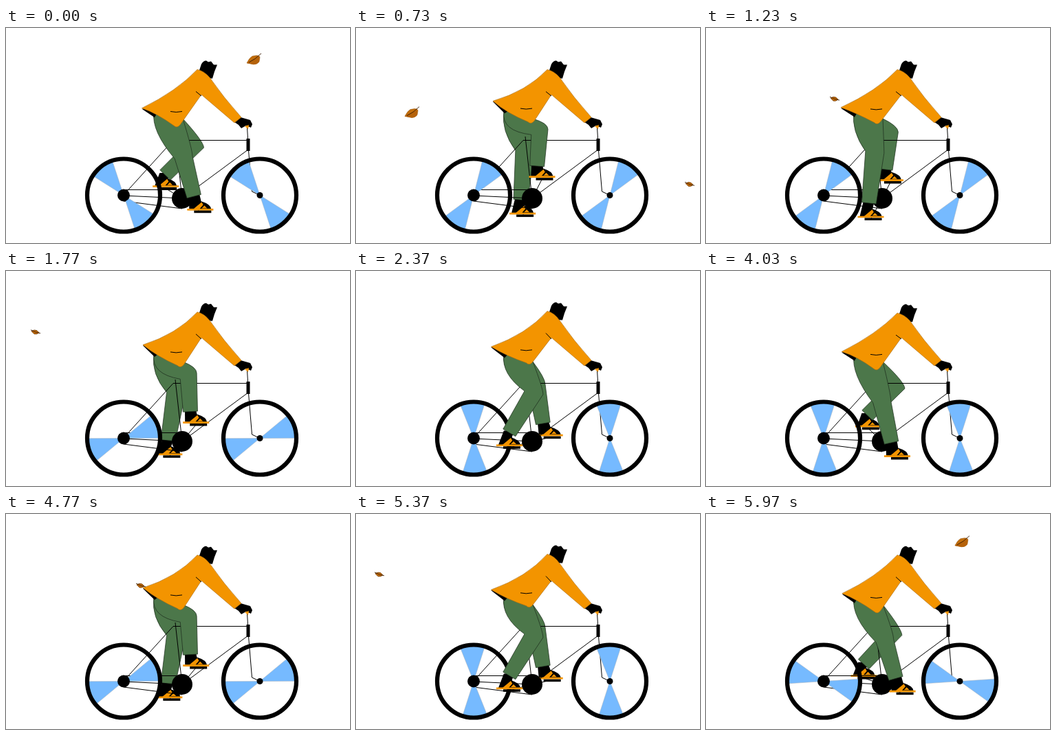
An HTML page with a canvas that plays this animation: 500x313 px, repeating every 6010 ms.

```html
<!DOCTYPE html>
<html lang="en">
<head>
<meta charset="utf-8">
<title>Cyclist</title>
<style>
html, body { margin: 0; width: 100%; height: 100%; overflow: hidden; background: #fff; }
canvas { display: block; }
</style>
</head>
<body>
<canvas id="stage" width="500" height="313"></canvas>
<script>
const ctx = document.getElementById('stage').getContext('2d');
const TAU = Math.PI * 2, LOOP = 6010;
const BLACK = '#000', ORANGE = '#f39400', GREEN = '#4c774a', BLUE = '#76baff';
const wave = phase => Math.cos(phase * TAU);

// Flight paths through a few points: age in frames, x, y
const BIG_PATH = [[0, 456, 4], [8, 361, 45], [16, 236, 88], [33, 49, 130]];
const SMALL_PATH = [[0, 508, 240], [6, 439, 202], [16, 196, 104], [36, 16, 86]];

function shape(d, fill, stroke, width = 1) {
  const path = new Path2D(d);
  if (fill) { ctx.fillStyle = fill; ctx.fill(path); }
  if (stroke) { ctx.strokeStyle = stroke; ctx.lineWidth = width; ctx.stroke(path); }
}

function disc(x, y, r) {
  ctx.beginPath();
  ctx.arc(x, y, r, 0, TAU);
  ctx.fillStyle = BLACK;
  ctx.fill();
}

function moved(x, y, draw) {
  ctx.save();
  ctx.translate(x, y);
  draw();
  ctx.restore();
}

function wheel(x, turn, hub) {
  const y = 243.5;
  for (const side of [0, Math.PI]) {
    ctx.beginPath();
    ctx.moveTo(x, y);
    ctx.arc(x, y, 51, turn + side - .345, turn + side + .345);
    ctx.closePath();
    ctx.fillStyle = BLUE;
    ctx.fill();
    ctx.strokeStyle = '#a5aeb8';
    ctx.lineWidth = .5;
    ctx.stroke();
  }
  ctx.beginPath();
  ctx.arc(x, y, 53, 0, TAU);
  ctx.strokeStyle = BLACK;
  ctx.lineWidth = 6.2;
  ctx.stroke();
  disc(x, y, hub);
}

function shoe() {
  shape('M-15 -1L-10 -10L2 -12Q15 -8 16 -1Z', BLACK);
  shape('M-10 -1L2 -11L8 -1Z', ORANGE);
  shape('M-1 -1L5 -8Q14 -6 15 -1Z', BLACK);
  shape('M2 -2L6 -6L10 -2Z', ORANGE);
  shape('M-19 -1.5H19V1.2H-19Z', ORANGE);
  shape('M-9 1.3H16V4.8H-9Z', BLACK);
}

function leg(phase, radius) {
  const c = wave(phase), s = Math.sin(phase * TAU), c2 = wave(2 * phase);
  const reach = radius / 33;
  const kx = 261 - 8 * c - 10 * s + 5 * c2;
  const ky = 171 + reach * (8 * c + 14 * s + 7 * c2);

  const crank = phase * TAU + .593, pc = Math.cos(crank), ps = Math.sin(crank);
  const sx = 255 + radius * pc, sy = 246 + radius * ps;
  const ax = sx - 5 - 5 * pc, ay = sy - 18 - 2.5 * ps;

  shape(`M256 248L${sx} ${sy + 3}`, null, BLACK);
  shape(`M${ax - 8} ${ay - 3}L${ax + 8} ${ay - 3}L${sx + 2} ${sy - 9}L${sx - 3} ${sy - 1}H${sx - 16}Z`, BLACK);
  moved(sx, sy, shoe);

  // Trouser edges lie either side of the hip, knee and ankle centres
  const shin = Math.atan2(ay - ky, ax - kx), thigh = Math.atan2(ky - 128, kx - 235);
  const bend = (shin + thigh) / 2;
  const nx = 13.5 * Math.sin(bend), ny = -13.5 * Math.cos(bend);
  const mx = 10.5 * Math.sin(shin), my = -10.5 * Math.cos(shin);
  shape(`M215 122Q211 150 ${kx - nx} ${ky - ny}L${ax - mx} ${ay - my}L${ax + mx} ${ay + my}
    L${kx + nx} ${ky + ny + 4}Q${kx + nx} ${ky + ny - 5} 257 132L240 115Z`, GREEN, '#1c2a1c', .7);
}

function bikeFrame() {
  shape(`M171 243L243 163.5H352M246 158L256 248L352 177M350.5 144L352.5 178L357.5 238L369 243.5
    M171 235.5H256M171 244L256 248M171 252L256 263`, null, BLACK);
  shape('M352 161V179', null, BLACK, 5);
}

function rider(phase) {
  const tilt = wave(phase), sway = wave(phase - .1);
  const bob = .3 + 1.8 * wave(2 * (phase - .12));
  const bx = 197.5 - 1.5 * Math.sin(phase * TAU), by = 112 + 7 * sway;
  const fx = 252 - 4 * sway, fy = 140 + 5 * tilt, pocket = 117.5 + 4 * tilt;

  shape(`M${bx} ${by}L216 ${127 + 4 * sway}L221 121L${bx + 12} ${by - 2}Z`, BLACK);
  moved(0, bob, () => shape(
    'M281 61L284 52Q287 47 291 47L294 49L298 48L302 53L307 53L303 63L300 73Q291 73 284 68Z', BLACK));
  shape('M332 137L341 130L348 132L355 134L358 140L356 145L349 142L342 146L338 141Z', BLACK);
  shape('M347 143L353 141L352 147Z', ORANGE);
  shape(`M${bx} ${by - 1}Q248 92 278 ${60 + bob}Q288 ${62 + bob} 296 72
    Q316 101 342 130L332 138L284 97L${fx + 5} ${fy - 5}Q${fx} ${fy + 2} ${fx - 5} ${fy - 3}
    Q219 124 ${bx} ${by - 1}Z`, ORANGE, '#a56a12', .6);
  shape(`M276 ${92 + bob}L284 99`, null, BLACK);
  shape(`M239 ${pocket}Q247 ${pocket + 2} 256 ${pocket}`, null, BLACK);
}

function bigLeaf() {
  shape('M-11 6Q-7 -2 -3 -4L3 -5Q8 -5 8 -2L7 4Q4 8 -1 8Z', '#c26e0c', '#8c4c08', .5);
  shape('M-11 6L7 -4L7 4Q4 8 -1 8Z', '#b5620a');
  shape('M-8 5Q1 1 10 -8', null, '#3a1e05', .9);
}

function smallLeaf() {
  shape('M-6 -1Q-2 -4 2 -2L5 1Q2 4 -2 3Z', '#c46c08', '#6b3805', .8);
  shape('M-7 -3L-1 0L7 2', null, '#3a1e05', .9);
}

function fly(path, age, draw) {
  const i = path.findIndex(point => age <= point[0]);
  if (age < 0 || i < 0) return;
  const [t0, x0, y0] = path[Math.max(i - 1, 0)], [t1, x1, y1] = path[i];
  const k = (age - t0) / (t1 - t0 || 1);
  moved(x0 + (x1 - x0) * k, y0 + (y1 - y0) * k, draw);
}

function render(ms) {
  // The picture advances in steps of 1/30 s
  const step = Math.floor((Math.floor(ms % LOOP / 10) + .4) * .3);
  const frame = Math.min(step, 179);
  const phase = frame % 30 / 30;
  const turn = (52 + 36 * frame) * Math.PI / 180;

  ctx.fillStyle = '#fff';
  ctx.fillRect(0, 0, 500, 313);
  leg(phase + .5, 27.5);
  bikeFrame();
  wheel(171, turn, 9);
  wheel(369, turn, 4.5);
  disc(256, 248, 15);
  leg(phase, 33);
  rider(phase);

  fly(BIG_PATH, (frame + 8) % 90, bigLeaf);
  fly(SMALL_PATH, frame - 20, smallLeaf);
  fly(SMALL_PATH, frame - 127, smallLeaf);
}

const start = performance.now();
function tick() {
  render(performance.now() - start);
  requestAnimationFrame(tick);
}
ctx.lineJoin = 'round';
tick();
</script>
</body>
</html>
```
